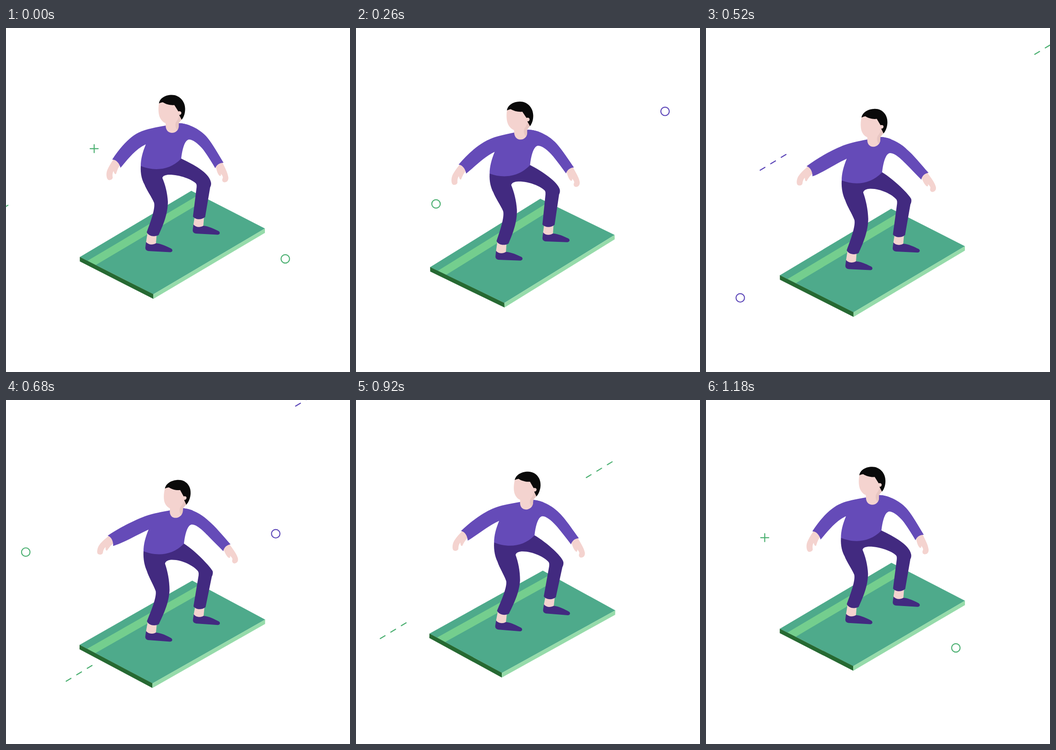
Recreate the animation shown at these times as an HTML page. Size 748 by 748 pixels, loop 1.2 s.

```html
<!DOCTYPE html>
<html lang="en">
<head>
<meta charset="utf-8">
<title>Board rider</title>
<style>
html, body { margin: 0; width: 100%; height: 100%; overflow: hidden; background: #fff; }
svg { display: block; width: 100vw; height: 100vh; }
.spark { fill: none; stroke-width: 2.2; stroke-linecap: round; }
</style>
</head>
<body>
<svg id="stage" viewBox="0 0 748 748">
  <g id="back"></g>
  <g id="rider"></g>
  <g id="front"></g>
</svg>
<script>
const STEP_MS = 20, STEPS = 60;
const GREEN = '#4aaf70', PURPLE = '#5c46b8';
const SKIN = '#f4d3cf', SHIRT = '#654bb8', PANTS = '#422a80';

// Pose keys, one value per step listed in KEYS
const KEYS = [0, 8, 18, 34, 42, 51];
const POSE = {
  hipX: [0, -2.5, -1.5, 6, 8.5, 4.5],
  hipY: [0, 6, 24.5, 28.5, 17, 2.5],
  tilt: [0, -.02, -.03, -.006, 0, .01],
  nod: [0, .027, .007, -.08, -.075, -.04],
  boardY: [0, 6.5, 30, 38, 25, 5],
  roll: [0, -.9, -1.1, 1, 1.6, 1.4],
  armL: [0, 1.3, 9.6, 17.1, 14, 4.4],
  armR: [0, -.7, -6.7, -10, -6.7, -2]
};

const clamp = v => Math.max(0, Math.min(1, v));
const mod = (a, b) => ((a % b) + b) % b;
const mix = (a, b, wx, wy = wx) => [a[0] + (b[0] - a[0]) * wx, a[1] + (b[1] - a[1]) * wy];

// Smooth periodic curve through the keys
function curve(vals, s) {
  const n = KEYS.length;
  const time = i => KEYS[mod(i, n)] + Math.floor(i / n) * STEPS;
  const val = i => vals[mod(i, n)];
  const slope = i => (val(i + 1) - val(i)) / (time(i + 1) - time(i));
  const tangent = i => {
    const a = time(i) - time(i - 1), b = time(i + 1) - time(i);
    return (slope(i - 1) * b + slope(i) * a) / (a + b);
  };
  let i = n - 1;
  while (KEYS[i] > s) i--;
  const h = time(i + 1) - time(i), u = (s - time(i)) / h, v = 1 - u;
  return val(i) * v * v * (1 + 2 * u) + val(i + 1) * u * u * (3 - 2 * u)
    + h * u * v * (tangent(i) * v - tangent(i + 1) * u);
}

function spin(x, y, cx, cy, deg) {
  const a = deg * Math.PI / 180, c = Math.cos(a), s = Math.sin(a);
  return [cx + (x - cx) * c - (y - cy) * s, cy + (x - cx) * s + (y - cy) * c];
}

// Swing about a joint that rides on the torso
function swing(p, x, y, jx, jy, deg, w) {
  const q = spin(x, y, jx, jy, deg), j = move.torso(p, jx, jy);
  return mix(move.torso(p, x, y), [q[0] + j[0] - jx, q[1] + j[1] - jy], w);
}

// Each mover takes a rest point to its posed place
const move = {
  board(p, x, y) {
    const q = spin(x, y, 361.75, 467, p.roll);
    return [q[0], q[1] + p.boardY];
  },
  torso: (p, x, y) => [x + p.hipX, y + p.hipY + p.tilt * (x - 336)],
  head(p, x, y) {
    const q = move.torso(p, x, y);
    return [q[0] + p.nod * (y - 250), q[1]];
  },
  armL: (p, x, y) =>
    swing(p, x, y, 289, 223, p.armL, clamp((275 - x) / 35 + (y - 260) / 100)),
  armR: (p, x, y) =>
    swing(p, x, y, 437, 237, p.armR, clamp((x - 410) / 45)),
  legs(p, x, y) {
    const w = clamp((y - 318) / 112 + Math.max(0, x - 385) / 150);
    // the thigh flattens as the legs stretch
    const thigh = y < 320 ? 1.4 * clamp((x - 395) / 45) : 0;
    return mix(move.torso(p, x, y), move.board(p, x, y), w, w * (2 - w) + thigh);
  }
};

const ANKLE = 'M308,444 L304,469 C310,476 321,475 326,469 L328,444 Z';
const SHOE = 'M304.5,465 C309,471.5 319,472.5 326,468 C338,469 350,475 359,479.5 ' +
  'C363.5,482 362.5,487.5 357,487.5 L310,485 C304.5,484 303,481 303,477.5 Z';
const shift = (d, dx, dy) =>
  d.replace(/([\d.]+),([\d.]+)/g, (m, x, y) => `${+x + dx},${+y + dy}`);

const PARTS = [
  ['board', '#4eaa8b', 'M160.5,498 L403,354 L563,436 L320.5,579 Z'],
  ['board', '#74ce8e', 'M177,506.3 L419.5,362.4 L437.5,371.6 L195,515.4 Z'],
  ['board', '#266932', 'M160.5,497.8 L320.5,578.8 L320.5,589 L160.5,507.5 Z'],
  ['board', '#96dbaa', 'M320.5,578.8 L563,435.8 L563,445.5 L320.5,589 Z'],
  ['board', SKIN, ANKLE],
  ['board', SKIN, shift(ANKLE, 103, -38)],
  ['board', PANTS, SHOE],
  ['board', PANTS, shift(SHOE, 103, -38)],
  ['armL', SKIN, 'M234,285 C228,294 221,305 219,313 C217.5,320 219,329 223,330.5 ' +
    'C227,331.5 232,329 232,325 C231,318 232,314 234,311 C235,317 238,319 239.5,317 ' +
    'C241,312 243,305 248,298 L244,288 Z'],
  ['armR', SKIN, 'M456,300 C458,310 460,317 464,321 C467,323 468,320 467.5,317 ' +
    'C470,320 472,323 471.5,326 C469,330 470,334 474,335.5 C480,336 484,332 483.5,325 ' +
    'C482,314 476,304 470,291 Z'],
  ['legs', PANTS, 'M293,300 C292,318 296,331 301,340 C306,353 316,366 322,380 ' +
    'C325,392 315,420 306,444 C310,453 323,455 332,450 C341,430 352,405 352,378 ' +
    'C351,358 346,340 340,326 C341,321 348,319 355,319 C378,319 404,329 413,338 ' +
    'C415,341 414.5,343 414.5,346 L406.5,410 C412,417 425,418 433,411 L444,346 ' +
    'C446,343 446.5,338 445.5,335 C441,314 408,297 381,284 L340,280 Z'],
  ['torso', SHIRT, 'M348,212 C325,216 305,220 294,225 L290,240 L304,253 ' +
    'C297,270 293,285 293,300 C320,311 355,311 381,284 C383,265 388,246 396,243 ' +
    'L400,212 C391,208.5 383,207 376,207 Z'],
  ['armL', SHIRT, 'M304,253 C281,263 262,289 249,304 C247,295 240,286 231,286 ' +
    'C247,261 270,234 294,225 L330,216 L330,250 Z'],
  ['armR', SHIRT, 'M394,243.5 C405,238 423,257 430,266 C440,280 448,293 455,305 ' +
    'C458,297 465,293 473,293 C460,272 447,248 435,235 C420,219 395,207 376,207 L380,240 Z'],
  ['head', SKIN, 'M333,162 C331,172 331,182 333,190 C335,198 341,205 347,207 ' +
    'L347.3,214 C348,223 354,228 361,228 C369,228 375.3,222 375.5,214 L375.5,206 ' +
    'L382,198 L378,160 Z'],
  ['head', '#e8c6c2', 'M377,189 L382,199 L375.5,207 L375.3,216 L373,222 ' +
    'C368,217 367,209 370,204 C374,199 376,194 377,189 Z'],
  ['head', '#0a0a0a', 'M332.7,164 C334,153 346,145.5 360.5,145.5 ' +
    'C377,145.5 389.5,159 389.5,176 C389.5,186 386.5,194 382,199.5 L376,188 L374.5,181 ' +
    'L366,167.5 C358,168.5 348,166 341,161.5 C337,162 335,163 332.7,164 Z'],
  ['head', SKIN, 'M373,182 C377,180 381.3,181 381.3,184.5 C381.3,188.5 378,190 375,188 Z']
];

// Sparks: shape, colour, place at a given step, layer
const SHAPES = {
  dash: 'M0,0 l10.5,-6.3 M22.9,-14 l10.5,-6.3 M45.8,-28 l10.5,-6.3',
  ring: 'M-9.2,0 a9.2,9.2 0 1 1 18.4,0 a9.2,9.2 0 1 1 -18.4,0',
  plus: 'M-8.8,0 h17.6 M0,-8.8 v17.6'
};
const SPARKS = [
  ['plus', GREEN, 191.7, 262.3, 0, 'back'],
  ['ring', GREEN, 607.3, 502, 0, 'back'],
  ['dash', GREEN, 460, 123.7, 8, 'back'],
  ['ring', PURPLE, 352, 366.3, 8, 'back'],
  ['dash', PURPLE, 601.7, 353.3, 18, 'back'],
  ['dash', GREEN, 202.8, 353.3, 18, 'back'],
  ['ring', GREEN, 494, 197.5, 18, 'back'],
  ['dash', PURPLE, 629.7, 13.3, 34, 'back'],
  ['dash', GREEN, 130.8, 611.5, 34, 'back'],
  ['ring', GREEN, 43, 330.7, 34, 'back'],
  ['ring', PURPLE, 586.5, 290.8, 34, 'back'],
  ['dash', GREEN, 244.7, 316.7, 42, 'back'],
  ['ring', GREEN, 251.3, 604.3, 42, 'back'],
  ['dash', GREEN, 372.7, 333.8, 51, 'front']
];

function addPath(parent, attrs) {
  const el = document.createElementNS('http://www.w3.org/2000/svg', 'path');
  for (const k in attrs) el.setAttribute(k, attrs[k]);
  return document.getElementById(parent).appendChild(el);
}

const parts = PARTS.map(([mover, fill, d]) => ({ mover, d, el: addPath('rider', { fill }) }));
const sparks = SPARKS.map(([shape, stroke, x, y, at, layer]) =>
  ({ x, y, at, el: addPath(layer, { class: 'spark', stroke, d: SHAPES[shape] }) }));

function draw(ms) {
  // each picture holds for one step; the small bias absorbs timer rounding
  const s = mod(Math.floor(ms / STEP_MS + .02), STEPS);
  const pose = {};
  for (const k in POSE) pose[k] = curve(POSE[k], s);
  for (const { mover, d, el } of parts) {
    el.setAttribute('d', d.replace(/([\d.]+),([\d.]+)/g, (m, x, y) =>
      move[mover](pose, +x, +y).map(v => v.toFixed(2)).join(',')));
  }
  for (const { x, y, at, el } of sparks) {
    const n = mod(s - at + STEPS / 2, STEPS) - STEPS / 2;
    el.setAttribute('transform', `translate(${(x + 64 * n).toFixed(2)} ${(y - 37 * n).toFixed(2)})`);
  }
}

function tick() {
  draw(performance.now());
  requestAnimationFrame(tick);
}
draw(0);
requestAnimationFrame(tick);
</script>
</body>
</html>
```
